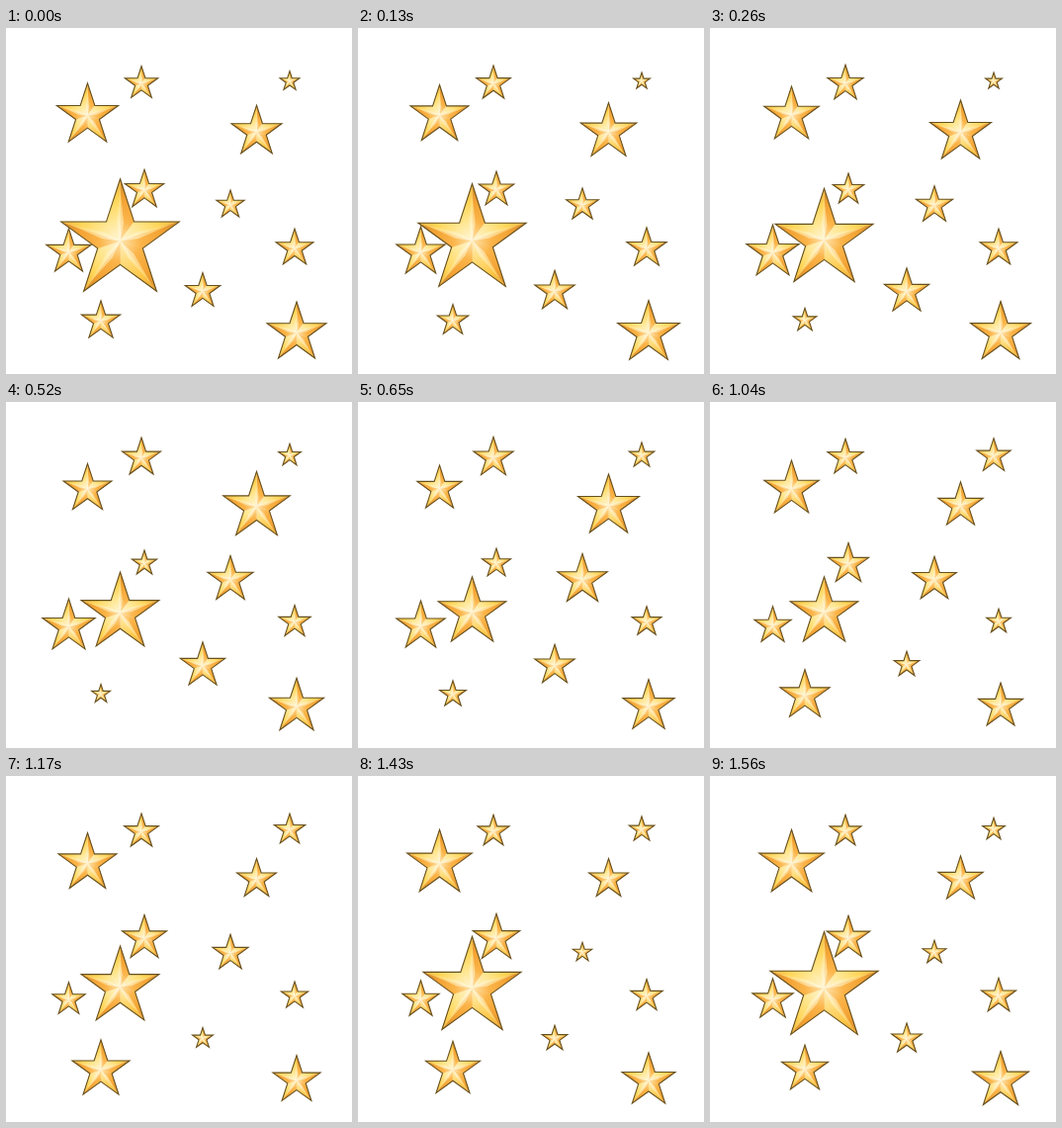
These frames come from a looping animation (350x350 px, 1690 ms). An HTML page:

```html
<!DOCTYPE html>
<html>
<head>
<meta charset="utf-8">
<title>Twinkling stars</title>
<style>
html, body { margin: 0; width: 100%; height: 100%; overflow: hidden; background: #fff; }
svg { display: block; width: 100vw; height: 100vh; }
</style>
</head>
<body>
<svg id="stage" viewBox="0 0 350 350"><defs id="defs"></defs></svg>
<script>
const NS = 'http://www.w3.org/2000/svg';
const STEP = 130, STEPS = 13;
const stage = document.getElementById('stage');
const defs = document.getElementById('defs');

// Each star swells and shrinks between two widths, once per loop.
// fall is the number of steps from widest to narrowest.
const STARS = [
  { x: 82.5, y: 85.5, min: 48, max: 70, peak: 11.5 },
  { x: 137, y: 54.5, min: 34, max: 43, peak: 5 },
  { x: 287, y: 53, min: 18, max: 37, peak: 8 },
  { x: 253.5, y: 102.5, min: 37, max: 73, peak: 3.5 },
  { x: 140, y: 162, min: 27, max: 53, peak: 10.3 },
  { x: 227, y: 177.5, min: 22, max: 60, peak: 6.5, fall: 4.5 },
  { x: 63.5, y: 224.5, min: 34, max: 60, peak: 3 },
  { x: 292, y: 221, min: 26, max: 43, peak: 1 },
  { x: 199, y: 264.5, min: 21, max: 53, peak: 3 },
  { x: 96, y: 294.5, min: 16, max: 67, peak: 9.8 },
  { x: 294, y: 305.5, min: 47, max: 66, peak: 1.2 },
  { x: 115.5, y: 209.5, min: 56, max: 122, peak: 0 }
];

function add(parent, tag, attrs) {
  const el = document.createElementNS(NS, tag);
  for (const k in attrs) el.setAttribute(k, attrs[k]);
  return parent.appendChild(el);
}

function gradient(id, colors) {
  const g = add(defs, 'radialGradient', {
    id, gradientUnits: 'userSpaceOnUse', cx: 0, cy: 0, r: 100
  });
  colors.forEach((c, i) => add(g, 'stop', {
    offset: i / (colors.length - 1), 'stop-color': c
  }));
}

gradient('light', ['#fff6d8', '#ffe794', '#ffd658', '#f0b23c']);
gradient('gold', ['#fff0c4', '#ffdc7c', '#ffc748', '#e5a030']);
gradient('amber', ['#ffe5ae', '#fbb54a', '#f3a233', '#d08a2a']);
gradient('ray', ['#fffdf4', '#fff3c8', '#ffdf85', '#f2b748']);

// Point at a turn of n tenths, clockwise from the top.
function point(n, r) {
  const a = n * Math.PI / 5;
  return (r * Math.sin(a)).toFixed(2) + ',' + (-r * Math.cos(a)).toFixed(2);
}

// Even corners are tips, odd ones are notches.
const corner = n => point(n, n % 2 ? 38.2 : 100);

const outline = Array.from({ length: 10 }, (_, n) => corner(n)).join(' ');
const FACES = ['amber', 'light', 'amber', 'amber', 'gold',
               'amber', 'light', 'amber', 'light', 'light'];

const shape = add(defs, 'g', { id: 'star' });
FACES.forEach((tone, n) => add(shape, 'polygon', {
  points: '0,0 ' + corner(n) + ' ' + corner(n + 1),
  fill: `url(#${tone})`, stroke: `url(#${tone})`, 'stroke-width': 0.8
}));
// Soft highlight along each ridge.
for (let n = 0; n < 10; n += 2) {
  add(shape, 'polygon', {
    points: ['0,0', point(n - 0.3, 30), point(n, 85), point(n + 0.3, 30)].join(' '),
    fill: 'url(#ray)', opacity: 0.6
  });
}
add(shape, 'polygon', {
  points: outline, fill: 'none', stroke: '#66501f', 'stroke-width': 1.1,
  'vector-effect': 'non-scaling-stroke'
});

function widthAt({ min, max, peak, fall = STEPS / 2 }, step) {
  const since = (step - peak + STEPS) % STEPS;
  const low = since < fall ? since / fall : (STEPS - since) / (STEPS - fall);
  return max - (max - min) * low;
}

const nodes = STARS.map(() => add(stage, 'use', { href: '#star' }));

function draw(ms) {
  const step = Math.floor(ms / STEP) % STEPS;
  STARS.forEach((star, i) => {
    // The mitred outline reaches past the tips, so the body is a little smaller.
    const r = widthAt(star, step) / 1.902 - 1.4;
    nodes[i].setAttribute('transform',
      `translate(${star.x} ${star.y + 0.095 * r}) scale(${r / 100})`);
  });
}

let start;
function tick(now) {
  if (start === undefined) start = now;
  draw(Math.max(0, now - start));
  requestAnimationFrame(tick);
}
draw(0);
requestAnimationFrame(tick);
</script>
</body>
</html>
```
